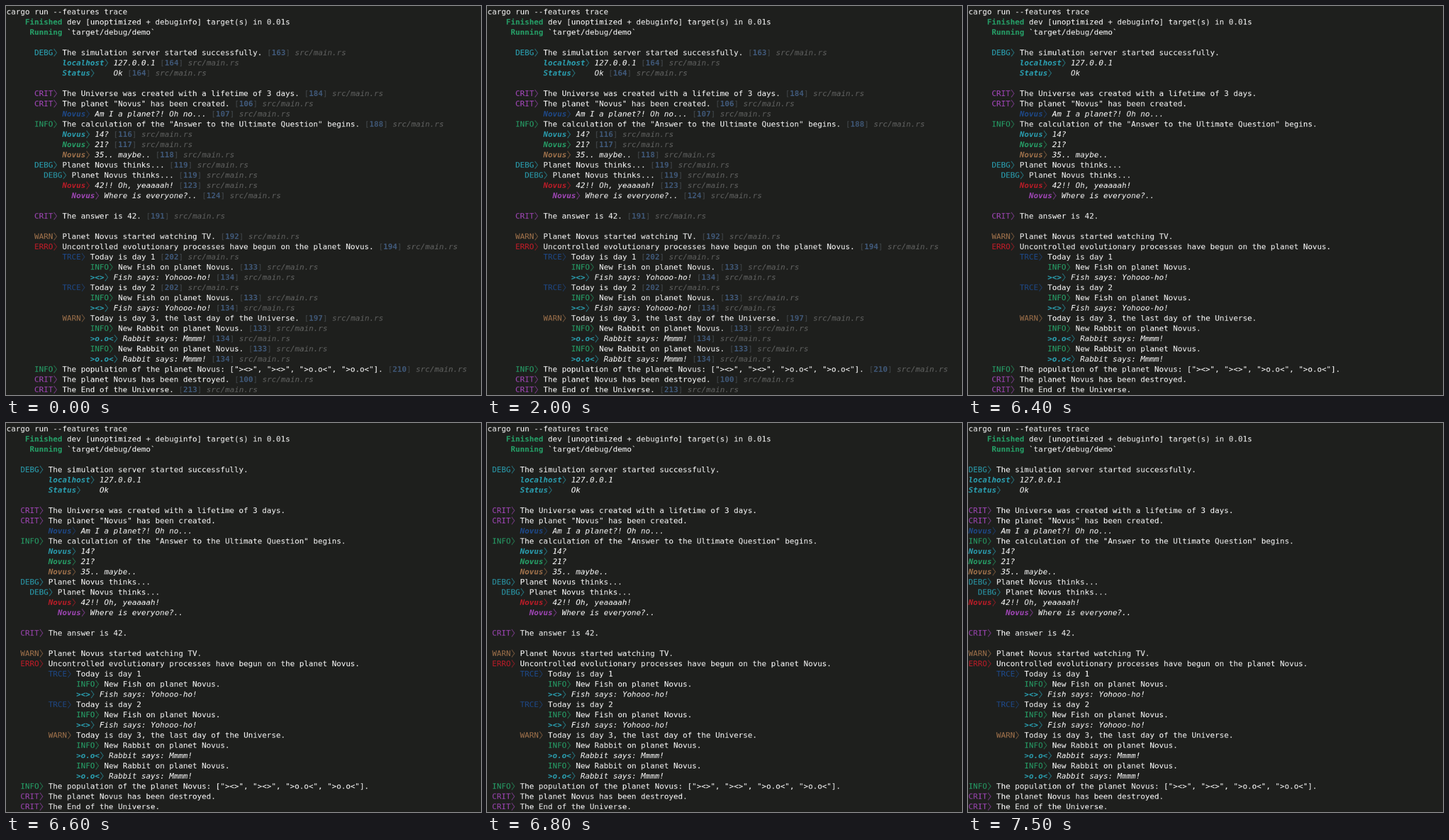
An HTML page with a canvas for the animation above (8000 ms loop, 826 by 678 pixels).

```html
<!DOCTYPE html>
<html lang="en">
<head>
<meta charset="utf-8">
<title>Log demo</title>
<style>
html, body { margin: 0; width: 100%; height: 100%; overflow: hidden; background: #1e1f1d; }
canvas { display: block; }
</style>
</head>
<body>
<canvas id="stage" width="826" height="678"></canvas>
<script>
const view = document.getElementById('stage').getContext('2d');
view.imageSmoothingQuality = 'high';

// The terminal is drawn on whole-pixel cells, then scaled down to the stage.
const term = document.createElement('canvas');
term.width = 1021;
term.height = 838;
const ctx = term.getContext('2d');

const LOOP = 8000;
const CELL = 10, ROW = 22, PAD = 1, ASCENT = 17;
const FACE = '16.6px "DejaVu Sans Mono", monospace';
const BG = '#1e1f1d', WHITE = '#ffffff';
const BRACKET = '#43484c', NUMBER = '#40597a', FILE = '#636463';
const COLOR = {
  cyan: '#2aa1b3', magenta: '#a347ba', green: '#26a269',
  brown: '#a2734c', red: '#c01c28', blue: '#1e4a8c'
};
const LEVEL = {
  DEBG: 'cyan', CRIT: 'magenta', INFO: 'green',
  WARN: 'brown', ERRO: 'red', TRCE: 'blue'
};

// Each entry: row, column, tag, message, source line.
const logs = [
  [4, 6, 'DEBG', 'The simulation server started successfully.', 163],
  [8, 6, 'CRIT', 'The Universe was created with a lifetime of 3 days.', 184],
  [9, 6, 'CRIT', 'The planet "Novus" has been created.', 106],
  [11, 6, 'INFO', 'The calculation of the "Answer to the Ultimate Question" begins.', 188],
  [15, 6, 'DEBG', 'Planet Novus thinks...', 119],
  [16, 8, 'DEBG', 'Planet Novus thinks...', 119],
  [20, 6, 'CRIT', 'The answer is 42.', 191],
  [22, 6, 'WARN', 'Planet Novus started watching TV.', 192],
  [23, 6, 'ERRO', 'Uncontrolled evolutionary processes have begun on the planet Novus.', 194],
  [24, 12, 'TRCE', 'Today is day 1', 202],
  [25, 18, 'INFO', 'New Fish on planet Novus.', 133],
  [27, 12, 'TRCE', 'Today is day 2', 202],
  [28, 18, 'INFO', 'New Fish on planet Novus.', 133],
  [30, 12, 'WARN', 'Today is day 3, the last day of the Universe.', 197],
  [31, 18, 'INFO', 'New Rabbit on planet Novus.', 133],
  [33, 18, 'INFO', 'New Rabbit on planet Novus.', 133],
  [35, 6, 'INFO', 'The population of the planet Novus: ["><>", "><>", ">o.o<", ">o.o<"].', 210],
  [36, 6, 'CRIT', 'The planet Novus has been destroyed.', 100],
  [37, 6, 'CRIT', 'The End of the Universe.', 213]
];

// Spoken lines: row, column, speaker, colour, message, source line.
const voices = [
  [5, 12, 'localhost', 'cyan', '127.0.0.1', 164],
  [6, 12, 'Status', 'cyan', '   Ok', 164],
  [10, 12, 'Novus', 'blue', 'Am I a planet?! Oh no...', 107],
  [12, 12, 'Novus', 'cyan', '14?', 116],
  [13, 12, 'Novus', 'green', '21?', 117],
  [14, 12, 'Novus', 'brown', '35.. maybe..', 118],
  [17, 12, 'Novus', 'red', '42!! Oh, yeaaaah!', 123],
  [18, 14, 'Novus', 'magenta', 'Where is everyone?..', 124],
  [26, 18, '><>', 'cyan', 'Fish says: Yohooo-ho!', 134],
  [29, 18, '><>', 'cyan', 'Fish says: Yohooo-ho!', 134],
  [32, 18, '>o.o<', 'cyan', 'Rabbit says: Mmmm!', 134],
  [34, 18, '>o.o<', 'cyan', 'Rabbit says: Mmmm!', 134]
];

const xOf = col => PAD + col * CELL;
const yOf = row => PAD + ASCENT + row * ROW;

// Writes a run and returns the column after it.
function put(row, col, text, color, style = '') {
  ctx.font = style + ' ' + FACE;
  ctx.fillStyle = color;
  ctx.fillText(text, xOf(col), yOf(row));
  return col + text.length;
}

function chevron(row, col, color) {
  const x = xOf(col) + 2, y = yOf(row) - 5.5;
  ctx.globalAlpha = 0.7;
  ctx.strokeStyle = color;
  ctx.lineWidth = 1.3;
  ctx.beginPath();
  ctx.moveTo(x, y - 8);
  ctx.lineTo(x + 6, y);
  ctx.lineTo(x, y + 8);
  ctx.stroke();
  ctx.globalAlpha = 1;
  return col + 1;
}

function putLine(row, col, line) {
  col = put(row, col, '[', BRACKET);
  col = put(row, col, String(line), NUMBER, 'bold');
  return put(row, col, ']', BRACKET);
}

function putFile(row, col) {
  return put(row, col, 'src/main.rs', FILE, 'italic');
}

function putPlace(row, col, line, mode) {
  if (mode === 'line') putFile(row, putLine(row, col, line) + 1);
  if (mode === 'file') putLine(row, putFile(row, col) + 1, line);
}

function entry(row, col, tag, color, text, line, mode, spoken) {
  col = put(row, col, tag, color, spoken ? 'italic bold' : '');
  col = chevron(row, col, color) + 1;
  col = put(row, col, text, WHITE, spoken ? 'italic' : '');
  putPlace(row, col + 1, line, mode);
}

function draw(t) {
  ctx.fillStyle = BG;
  ctx.fillRect(0, 0, term.width, term.height);

  put(0, 0, 'cargo run --features trace', WHITE);
  put(1, put(1, 4, 'Finished', COLOR.green, 'bold') + 1,
    'dev [unoptimized + debuginfo] target(s) in 0.01s', WHITE);
  put(2, put(2, 5, 'Running', COLOR.green, 'bold') + 1, '`target/debug/demo`', WHITE);

  // One column every 100 ms: first the whole log, then the upper spoken lines.
  const steps = Math.max(0, Math.min(12, Math.floor((t - 6300) / 100)));
  const shift = Math.min(6, steps);
  const extra = steps - shift;
  const mode = t >= 4200 ? 'none' : t >= 1200 && t < 2000 ? 'file' : 'line';

  for (const [row, col, tag, text, line] of logs)
    entry(row, col - shift, tag, COLOR[LEVEL[tag]], text, line, mode, false);
  for (const [row, col, who, hue, text, line] of voices)
    entry(row, col - shift - (col === 12 ? extra : 0), who, COLOR[hue], text, line, mode, true);

  view.drawImage(term, 0, 0, 826, 678);
}

const start = performance.now();
function frame() {
  draw((performance.now() - start) % LOOP);
  requestAnimationFrame(frame);
}
draw(0);
requestAnimationFrame(frame);
</script>
</body>
</html>
```
